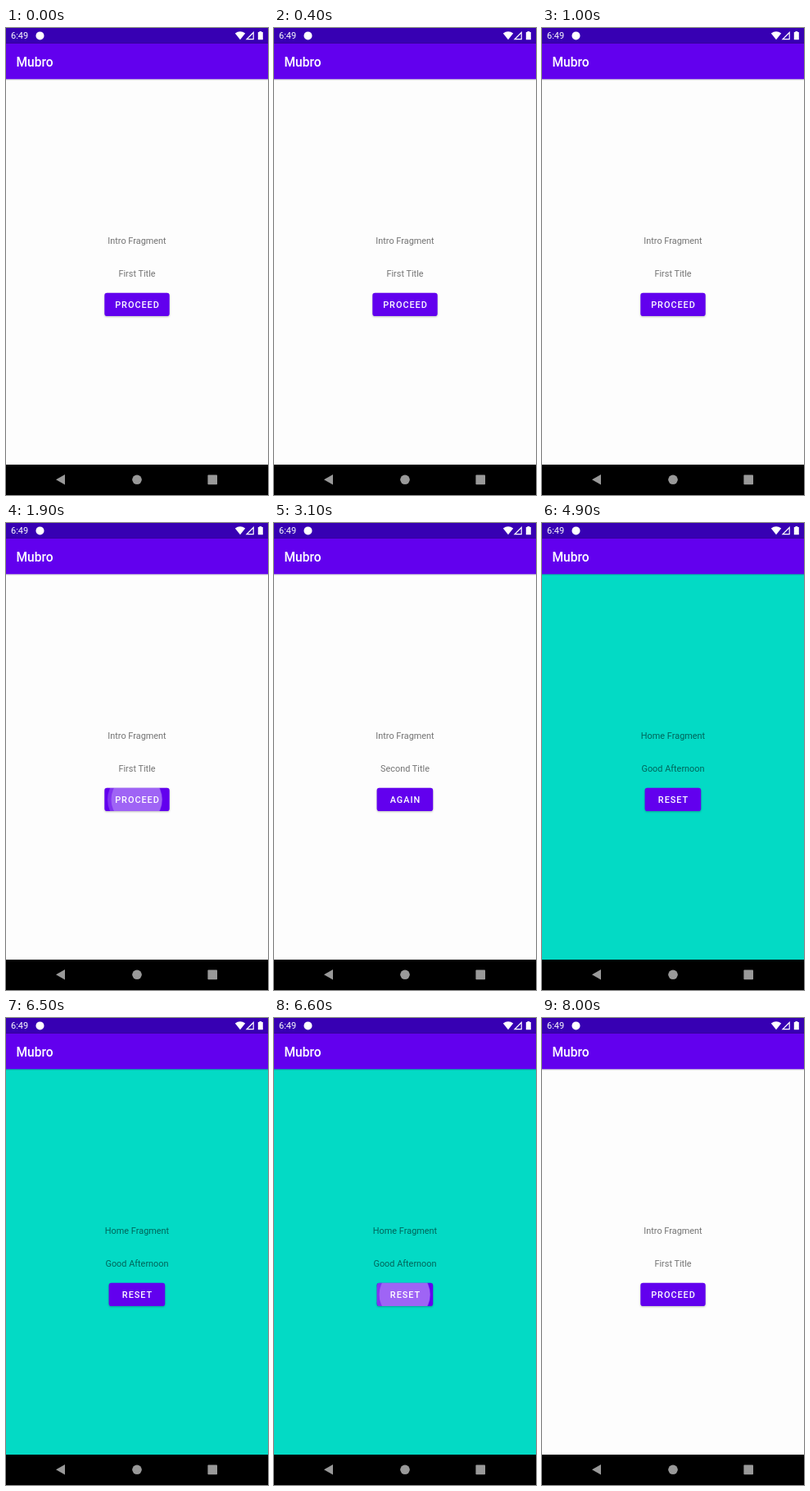
Write an HTML page that moves like this. It is 320 px wide and 569 px high and loops after 8100 ms.

```html
<!DOCTYPE html>
<html lang="en">
<head>
<meta charset="utf-8">
<title>Fragment steps</title>
<style>
  html, body { margin: 0; width: 100%; height: 100%; overflow: hidden; background: #000; }
  svg { display: block; width: 100vw; height: 100vh; font-family: Roboto, sans-serif; }

  .page, .scene, .ripple { animation: 8100ms step-end -8ms infinite; }
  .page { animation-name: page; }
  .first { animation-name: first; }
  .second { animation-name: second; }
  .third { animation-name: third; }
  .home { animation-name: home; }
  .ripple { animation-name: press; }

  .copy { font-size: 10.9px; text-anchor: middle; fill: #747474; }
  .home .copy { fill: #01645a; }
  .label { font-size: 10.9px; font-weight: 500; letter-spacing: .97px; text-anchor: middle; fill: #fff; }
  .button { fill: #6200ee; filter: drop-shadow(0 1px .8px rgba(0, 0, 0, .25)); }
  .ripple { fill: #fff; opacity: 0; }
  .nav { fill: #999; }

  @keyframes page {
    0% { fill: #fdfdfd; }
    60.494% { fill: #03dac5; }
    82.716%, 100% { fill: #fdfdfd; }
  }
  @keyframes first {
    0% { visibility: visible; }
    24.691% { visibility: hidden; }
    82.716%, 100% { visibility: visible; }
  }
  @keyframes second {
    0% { visibility: hidden; }
    24.691% { visibility: visible; }
    43.21%, 100% { visibility: hidden; }
  }
  @keyframes third {
    0% { visibility: hidden; }
    43.21% { visibility: visible; }
    60.494%, 100% { visibility: hidden; }
  }
  @keyframes home {
    0% { visibility: hidden; }
    60.494% { visibility: visible; }
    82.716%, 100% { visibility: hidden; }
  }
  /* Each tap appears at once; its tint then fades on the next label. */
  @keyframes press {
    0% { opacity: 0; }
    23.457% { opacity: 1; }
    24.691% { opacity: .8; animation-timing-function: steps(4, end); }
    29.63% { opacity: 0; }
    41.975% { opacity: 1; }
    43.21% { opacity: .8; animation-timing-function: steps(4, end); }
    48.148% { opacity: 0; }
    59.259% { opacity: 1; }
    60.494% { opacity: 0; }
    81.481% { opacity: 1; }
    82.716%, 100% { opacity: 0; }
  }
</style>
</head>
<body>
<svg viewBox="0 0 320 569" preserveAspectRatio="none">
  <defs>
    <linearGradient id="shade" x2="0" y2="1">
      <stop stop-opacity=".2"/>
      <stop offset="1" stop-opacity="0"/>
    </linearGradient>
    <rect id="wide" x="120.3" y="322.8" width="79.4" height="28.2" rx="3.1"/>
    <rect id="narrow" x="125.6" y="322.8" width="68.6" height="28.2" rx="3.1"/>
    <clipPath id="wideClip"><use href="#wide"/></clipPath>
    <clipPath id="narrowClip"><use href="#narrow"/></clipPath>
    <g id="wave">
      <circle cx="157.5" cy="337" r="33.5" fill-opacity=".2"/>
      <circle cx="159.5" cy="337" r="31" fill-opacity=".24"/>
    </g>
  </defs>

  <rect class="page" y="62" width="320" height="470"/>
  <rect y="62" width="320" height="2.5" fill="url(#shade)"/>

  <rect width="320" height="18.7" fill="#3700b3"/>
  <rect y="18.7" width="320" height="43.6" fill="#6200ee"/>
  <g fill="#fff">
    <text x="6" y="13.4" font-size="11">6:49</text>
    <circle cx="41.5" cy="9.4" r="5"/>
    <path d="M279.8 6.6Q286 2 292.2 6.6L286 14.2Z"/>
    <path d="M302.8 4V14.2H292.6ZM301.6 7L295.6 13H301.6Z" fill-rule="evenodd"/>
    <path d="M309.4 4h2.8v1.1h1.6v9.2h-6v-9.2h1.6Z"/>
    <text x="12.5" y="46.8" font-size="15.57" font-weight="500">Mubro</text>
  </g>

  <g class="scene first">
    <text class="copy" x="160" y="262.8">Intro Fragment</text>
    <text class="copy" x="160" y="302.8">First Title</text>
    <use class="button" href="#wide"/>
    <g clip-path="url(#wideClip)"><use class="ripple" href="#wave"/></g>
    <text class="label" x="160.5" y="341">PROCEED</text>
  </g>
  <g class="scene second">
    <text class="copy" x="160" y="262.8">Intro Fragment</text>
    <text class="copy" x="160" y="302.8">Second Title</text>
    <use class="button" href="#narrow"/>
    <g clip-path="url(#narrowClip)"><use class="ripple" href="#wave"/></g>
    <text class="label" x="160.5" y="341">AGAIN</text>
  </g>
  <g class="scene third">
    <text class="copy" x="160" y="262.8">Intro Fragment</text>
    <text class="copy" x="160" y="302.8">Third Title</text>
    <use class="button" href="#narrow"/>
    <g clip-path="url(#narrowClip)"><use class="ripple" href="#wave"/></g>
    <text class="label" x="160.5" y="341">DONE</text>
  </g>
  <g class="scene home">
    <text class="copy" x="160" y="262.8">Home Fragment</text>
    <text class="copy" x="160" y="302.8">Good Afternoon</text>
    <use class="button" href="#narrow"/>
    <g clip-path="url(#narrowClip)"><use class="ripple" href="#wave"/></g>
    <text class="label" x="160.5" y="341">RESET</text>
  </g>

  <rect y="532" width="320" height="37"/>
  <g class="nav">
    <path d="M61 550.3L72 544V556.6Z"/>
    <circle cx="160" cy="550.3" r="5.8"/>
    <rect x="246.4" y="544.6" width="11.6" height="11.6" rx=".8"/>
  </g>
</svg>
</body>
</html>
```
